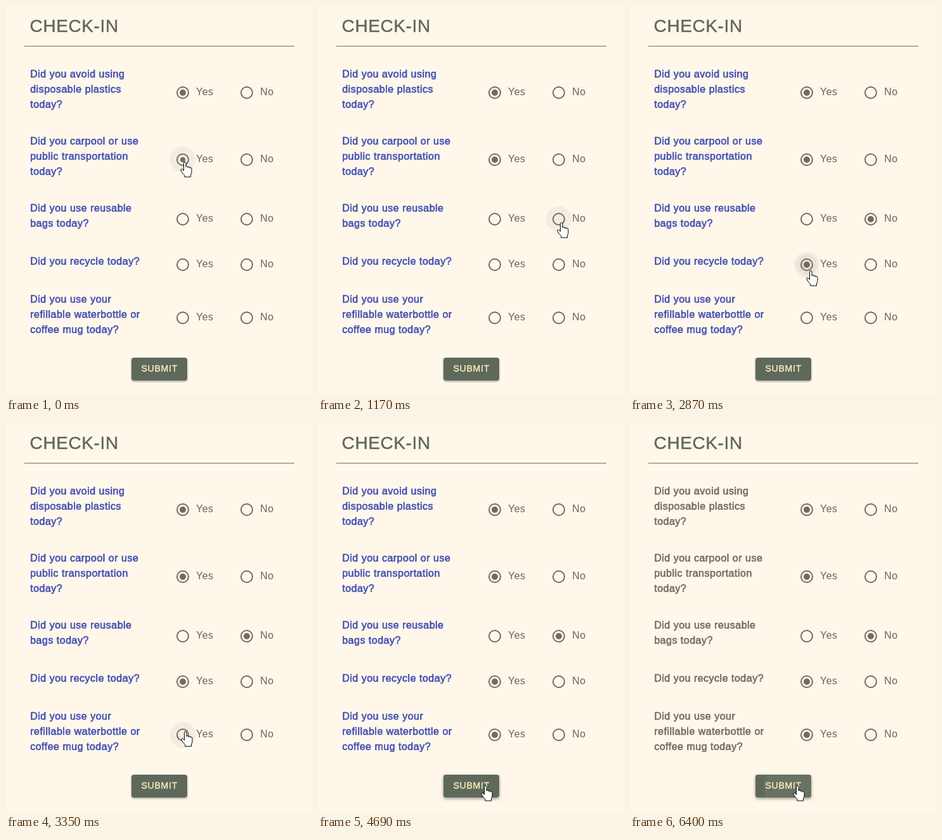
An HTML page that plays this animation: 483x615 px, repeating every 6.5 s.

```html
<!DOCTYPE html>
<html lang="en">
<head>
<meta charset="utf-8">
<title>Check-in form</title>
<style>
html, body { margin: 0; width: 100%; height: 100%; overflow: hidden; background: #fff7ea; }
svg { display: block; width: 483px; height: 615px; font-family: "Liberation Sans", Arial, sans-serif; }
.title { font-size: 28px; letter-spacing: .6px; fill: #5f665a; stroke: #5f665a; stroke-width: .4px; }
.question { font-size: 16px; letter-spacing: .5px; stroke-width: .65px; }
.label { font-size: 16px; letter-spacing: .5px; fill: #68655e; }
.submit { font-size: 14px; letter-spacing: .8px; fill: #f7efb8; stroke: #f7efb8; stroke-width: .4px; }
.ring { fill: none; stroke: #706c65; stroke-width: 2; }
.dot { fill: #706c65; }
.cursor { fill: #fff; stroke: #000; stroke-linejoin: round; }
</style>
</head>
<body>
<svg id="stage" viewBox="0 0 483 615">
  <defs>
    <clipPath id="buttonClip"><rect x="198" y="556" width="88" height="36" rx="4"/></clipPath>
    <filter id="blur" x="-20%" y="-40%" width="140%" height="180%"><feGaussianBlur id="spread" stdDeviation="1.5"/></filter>
  </defs>
  <rect width="483" height="615" fill="#fff7ea"/>
  <text class="title" x="37.6" y="41.3">CHECK-IN</text>
  <rect x="29" y="63" width="426" height="1" fill="#7a6a4e"/>
  <g id="form"></g>
  <rect id="shadow" x="198" width="88" height="36" rx="4" filter="url(#blur)"/>
  <rect x="198" y="556" width="88" height="36" rx="4" fill="#5e695c"/>
  <circle id="ripple" cx="265" cy="574" r="54" fill="#687262" clip-path="url(#buttonClip)"/>
  <text class="submit" x="213.4" y="578">SUBMIT</text>
  <path id="arrow" class="cursor" d="M.5 .5V16.5L4 13L6.5 18.5L9 17.5L6.5 12H11.5Z"/>
  <path id="hand" class="cursor" d="M-2.5 1.7Q-2.5 -.5-.8 -.5Q1 -.5 1 1.7V7.5Q1 6.2 2.7 6.2Q4.2 6.2 4.2 8.5Q4.2 7.2 5.8 7.2Q7.3 7.2 7.3 9.5Q7.3 8.3 8.5 8.3Q10 8.3 10 10.5V15.5Q10 18 8.5 20V23.2H-1.2V20.5Q-4.5 17.5-6.5 14Q-8 11-6 10.7Q-4.5 10.5-2.5 13.5Z"/>
</svg>
<script>
const LOOP = 6500, SENT = 6260, YES = 279, NO = 380;
const $ = id => document.getElementById(id);

// y: radio centre, top: first baseline, on/full: dot appears and reaches full size
const rows = [
  { y: 137, top: 113, lines: ["Did you avoid using", "disposable plastics", "today?"], x: YES, on: 0, full: 0 },
  { y: 243, top: 219, lines: ["Did you carpool or use", "public transportation", "today?"], x: YES, on: 0, full: 160,
    hover: [0, 280] },
  { y: 337, top: 325, lines: ["Did you use reusable", "bags today?"], x: NO, on: 1570, full: 1690,
    hover: [930, 1810], press: [1570, 1690] },
  { y: 409, top: 409, lines: ["Did you recycle today?"], x: YES, on: 2750, full: 2870,
    hover: [2060, 2990], press: [2750, 2990] },
  { y: 493, top: 469, lines: ["Did you use your", "refillable waterbottle or", "coffee mug today?"], x: YES, on: 3850, full: 3970,
    hover: [3350, 4210], press: [3850, 4090] }
];

// time, x, y of the pointer tip, shape
const path = [
  [0, 283, 247, "hand"], [160, 285, 250, "hand"], [280, 297, 266, "arrow"],
  [400, 318, 295, "arrow"], [520, 334, 318, "arrow"], [640, 340, 328, "arrow"],
  [780, 383, 364, "arrow"], [930, 389, 350, "hand"], [1050, 386, 345, "hand"],
  [1170, 385, 343, "hand"], [1690, 372, 354, "hand"], [1810, 325, 388, "arrow"],
  [1930, 295, 404, "hand"], [2060, 292, 406, "hand"], [2210, 288, 408, "hand"],
  [2870, 286, 419, "hand"], [2990, 285, 440, "arrow"], [3110, 284, 462, "arrow"],
  [3230, 283, 478, "hand"], [3350, 284, 488, "hand"], [4090, 281, 500, "hand"],
  [4210, 275, 530, "arrow"], [4330, 268, 558, "hand"], [4450, 265, 573, "hand"],
  [4570, 264, 573, "hand"], [4690, 265, 574, "hand"]
];

function add(parent, tag, attrs, text) {
  const el = document.createElementNS("http://www.w3.org/2000/svg", tag);
  for (const key in attrs) el.setAttribute(key, attrs[key]);
  if (text) el.textContent = text;
  return parent.appendChild(el);
}

const questions = add($("form"), "g", { class: "question" });
for (const row of rows) {
  row.lines.forEach((line, i) => add(questions, "text", { x: 38.2, y: row.top + 24 * i }, line));
  row.halo = add($("form"), "circle", { cx: row.x, cy: row.y, r: 20.5 });
  row.wave = add($("form"), "circle", { cx: row.x, cy: row.y, r: 16 });
  for (const [x, word, left] of [[YES, "Yes", 300], [NO, "No", 401.2]]) {
    add($("form"), "circle", { class: "ring", cx: x, cy: row.y, r: 9 });
    add($("form"), "text", { class: "label", x: left, y: row.y + 4 }, word);
  }
  row.dot = add($("form"), "circle", { class: "dot", cx: row.x, cy: row.y });
}

const within = (t, span) => !!span && t >= span[0] && t < span[1];

function draw(t) {
  for (const row of rows) {
    row.dot.setAttribute("r", t < row.on ? 0 : t < row.full ? 4 : 5);
    row.halo.setAttribute("fill-opacity", within(t, row.hover) ? .045 : 0);
    row.wave.setAttribute("fill-opacity", within(t, row.press) ? .04 : 0);
  }
  const ink = t < SENT ? "#4350b4" : "#716d67";
  questions.setAttribute("fill", ink);
  questions.setAttribute("stroke", ink);

  const over = t >= 4330;
  $("shadow").setAttribute("y", over ? 558 : 557.5);
  $("shadow").setAttribute("fill-opacity", over ? .4 : .38);
  $("spread").setAttribute("stdDeviation", over ? 2.5 : 1.5);
  $("ripple").setAttribute("opacity", t < SENT ? 0 : 1);

  const [, x, y, shape] = path.filter(p => p[0] <= t).pop();
  for (const id of ["hand", "arrow"]) {
    $(id).setAttribute("transform", `translate(${x} ${y})`);
    $(id).setAttribute("visibility", id === shape ? "visible" : "hidden");
  }
}

const start = performance.now();
function tick() {
  draw((performance.now() - start) % LOOP);
  requestAnimationFrame(tick);
}
tick();
</script>
</body>
</html>
```
